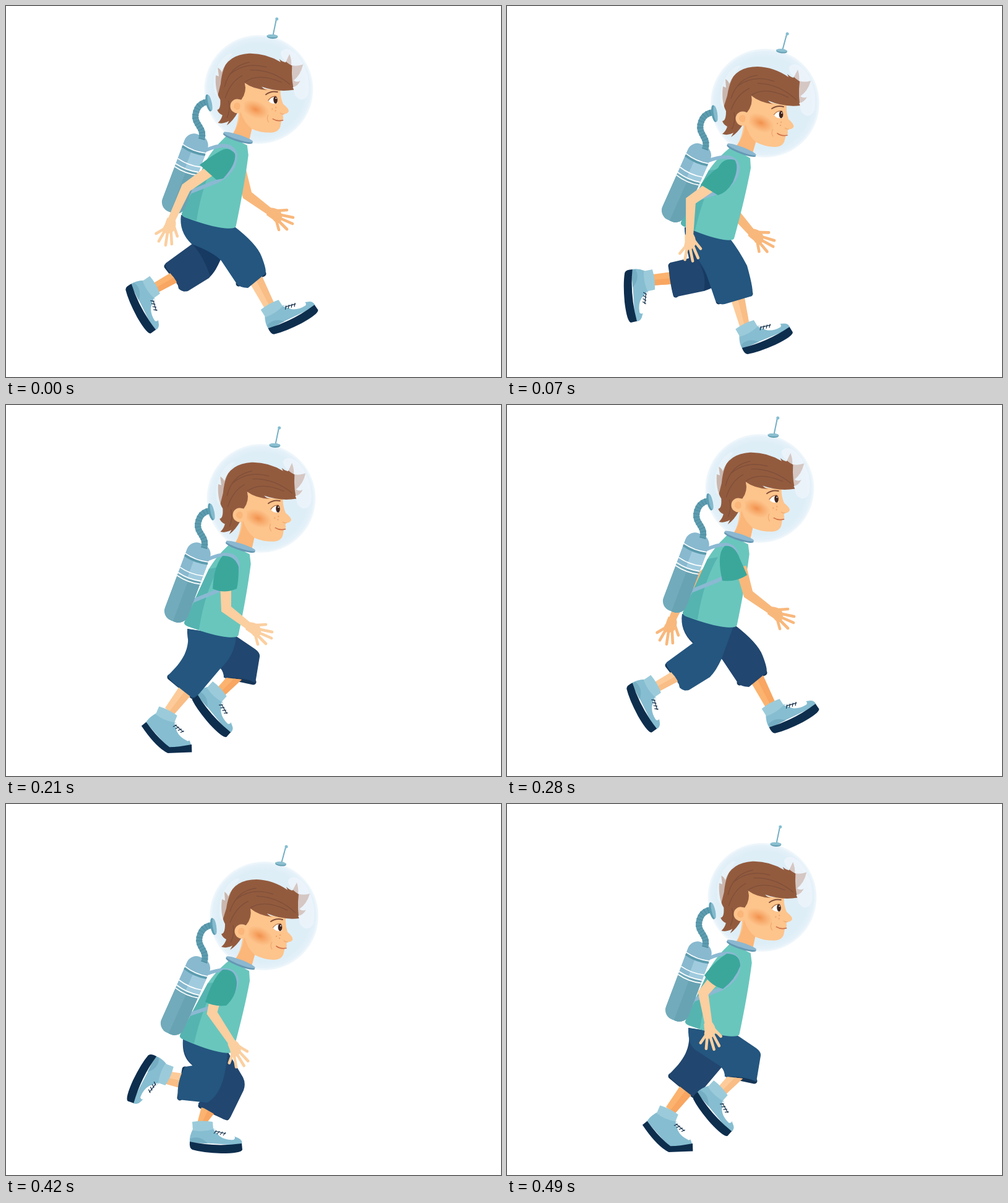
These frames come from a looping animation (800 px wide and 600 px high, 560 ms). An HTML page:

```html
<!DOCTYPE html>
<html lang="en">
<head>
<meta charset="utf-8">
<title>Running space boy</title>
<style>
  html, body { margin: 0; width: 100%; height: 100%; overflow: hidden; background: #fff; }
  svg { display: block; width: 100%; height: 100%; }
  .pose { visibility: hidden; animation: show 560ms step-end infinite; }
  @keyframes show {
    0% { visibility: visible; }
    12.5%, 100% { visibility: hidden; }
  }
</style>
</head>
<body>
<svg viewBox="0 0 800 600">
  <defs>
    <radialGradient id="glass">
      <stop offset=".85" stop-color="#deeef7"/>
      <stop offset=".95" stop-color="#e5f1f9"/>
      <stop offset="1" stop-color="#f3f9fc"/>
    </radialGradient>
    <radialGradient id="blush">
      <stop offset="0" stop-color="#f08a45" stop-opacity=".9"/>
      <stop offset="1" stop-color="#f59a55" stop-opacity="0"/>
    </radialGradient>
    <clipPath id="tankClip"><rect x="-20" y="-67" width="40" height="134" rx="17"/></clipPath>

    <g id="laces">
      <path fill="#fff" d="M17 11Q36 13 48 20Q55 24 50 28Q36 29 27 22Z"/>
      <path fill="none" stroke="#16314c" stroke-width="1.2" d="M18 18l4-5M23 19l4-5M28 20l4-5M33 21l4-5M20 14l17 4"/>
    </g>
    <path id="sock" fill="#9bcbda" d="M-17-1Q0-4 16-1L17 11Q0 16-16 13Z"/>
    <g id="shoe">
      <path fill="#86bdd1" d="M-16 11Q-22 22-21 32L63 37Q65 28 57 25Q40 18 17 10Z"/>
      <path fill="#75aec3" d="M-20 26Q-5 20 8 34L-21 33Z"/>
      <use href="#laces"/>
      <path fill="#0e2e4e" d="M-21 31Q20 40 63 34L64 44Q62 50 30 50Q0 49-17 44Q-22 42-21 31Z"/>
      <use href="#sock"/>
    </g>
    <g id="bentShoe">
      <path fill="#86bdd1" d="M-16 11Q-24 23-24 32L28 52L59 33Q50 20 17 10Z"/>
      <use href="#laces"/>
      <path fill="#0e2e4e" d="M-24 31L-28 40Q8 60 30 60L64 41L58 30Q40 44 28 50Q5 46-24 31Z"/>
      <use href="#sock"/>
    </g>
    <g id="hand">
      <path stroke="none" d="M-4-6Q8-9 17 0Q22 9 15 18Q8 18 4 12Q-2 8-6 5Z"/>
      <path fill="none" stroke-width="4.6" stroke-linecap="round" d="M6-2Q16-2 27-3M13 4L37 9M13 9L36 19M12 13L27 28M9 11L14 29"/>
    </g>

    <g id="head">
      <circle cx="417" cy="157" r="88" fill="url(#glass)"/>
      <path fill="#fdc48c" d="M384 168L396 143Q420 158 452 160Q451 172 455 183Q465 192 463 196Q460 200 454 199Q453 203 454 206L450 211Q450 213 449 216Q447 228 432 228Q415 227 402 220L396 241Q382 238 368 230Q384 212 384 168Z"/>
      <path fill="#fbb679" d="M385 190Q390 210 402 220L396 241Q382 238 368 230Q384 212 385 190Z"/>
      <ellipse cx="410" cy="189" rx="23" ry="14" fill="url(#blush)" transform="rotate(25 410 189)"/>
      <path fill="#935b3e" d="M381 192Q373 205 362 212L366 205Q357 210 348 207Q354 202 356 195Q350 192 348 186Q354 186 354 170Q346 155 349 130L354 132L353 118Q358 121 359 126Q370 98 405 98Q432 99 455 115L453 110Q458 115 463 116L470 103Q473 112 472 121Q480 124 491 121Q486 138 474 146Q480 150 485 147Q480 156 472 157L474 161Q448 164 422 153Q426 158 431 159Q408 156 395 145Q398 160 388 172Q375 171 373 183Z"/>
      <path fill="none" stroke="#80503a" stroke-width="1.5" d="M362 150Q372 116 405 112M362 168Q372 142 392 133M372 130Q398 110 432 122M395 144Q418 129 455 148M405 125Q440 126 468 152M363 200Q370 187 367 172"/>
      <circle cx="381" cy="182" r="11.5" fill="#fdc48c"/>
      <path fill="#fbb679" d="M375 183Q375 176 382 176Q388 179 384 187Q378 190 375 183Z"/>
      <path fill="none" stroke="#824f3a" stroke-width="2" stroke-linecap="round" d="M428 166Q437 160 447 163"/>
      <path fill="#fff" d="M432 177Q437 169 445 171L446 181Q437 183 432 177Z"/>
      <ellipse cx="443" cy="175.5" rx="3.3" ry="6" fill="#40241d"/>
      <circle cx="444" cy="173" r="1" fill="#fff"/>
      <path fill="none" stroke="#9a6445" d="M431 176Q437 168 445 170"/>
      <path fill="none" stroke="#cf7249" stroke-width="1.7" stroke-linecap="round" d="M437 206Q444 211 453 209"/>
      <path fill="none" stroke="#f1a96c" stroke-width="1.2" d="M449 197Q452 200 456 199M430 199Q426 205 430 211"/>
      <path fill="#f0a468" d="M436 189h2v2h-2zM442 187h2v2h-2zM441 192h2v2h-2z"/>
      <path fill="#f1f6fc" fill-opacity=".7" d="M456 100Q459 93 469 95Q488 103 497 139Q500 163 495 172Q486 184 475 170Q470 146 473 122Q456 111 456 100Z"/>
      <path fill="#eef5fb" fill-opacity=".6" d="M378 97Q360 116 356 145L350 164Q343 160 345 138Q352 107 373 96Z"/>
      <path fill="none" stroke="#75afc4" stroke-width="2" d="M445 72L452 46"/>
      <circle cx="453" cy="45" r="2.5" fill="#84bed1"/>
      <ellipse cx="444" cy="73" rx="9" ry="3.5" fill="#659fb3" transform="rotate(6 444 73)"/>
      <ellipse cx="444" cy="72" rx="9" ry="2.4" fill="#8bc0d1" transform="rotate(6 444 72)"/>
    </g>

    <g id="tank" transform="translate(290 286) rotate(24)">
      <g clip-path="url(#tankClip)">
        <path fill="#88b9cf" d="M-20-67h40V-8h-40z"/>
        <path fill="#a0cbde" d="M-3-38h23V-8H-3z"/>
        <path fill="#72abbb" d="M-20-8h40v75h-40z"/>
        <path fill="#68a3b3" d="M0-8h20v75H0z"/>
        <path fill="none" stroke="#fff" stroke-width="1.7" d="M-20-43Q0-38 20-43M-20-19Q0-14 20-19M-20-10Q0-5 20-10M-20-5Q0 0 20-5"/>
        <path fill="none" stroke="#5b9bad" stroke-width="3.5" d="M-20-40Q0-35 20-40"/>
      </g>
    </g>

    <g id="torso">
      <path fill="#69c6bd" d="M357 232Q338 248 326 266L281 350Q280 354 287 357Q325 374 350 378Q365 380 367 376Q385 310 394 262L393 246Q380 240 366 224Z"/>
      <path fill="#55b4b0" d="M326 266L281 350Q280 354 287 357L304 363Q318 300 343 264Z"/>
      <path fill="none" stroke="#8bb9d3" stroke-width="6" d="M326 250Q368 235 373 260Q373 286 342 301L294 317"/>
      <use href="#tank"/>
      <path fill="none" stroke="#5d9caf" stroke-width="10" d="M320 232C327 212 308 208 313 190Q317 174 333 172"/>
      <path fill="none" stroke="#4f8ea2" stroke-width="10.5" stroke-dasharray="1.2 4" d="M320 232C327 212 308 208 313 190Q317 174 333 172"/>
      <ellipse cx="335" cy="174" rx="4.5" ry="14" fill="#5b9db1" transform="rotate(-9 335 174)"/>
      <ellipse cx="337" cy="174" rx="3" ry="13" fill="#84bacd" transform="rotate(-9 337 174)"/>
      <g transform="rotate(21 379 233)">
        <ellipse cx="379" cy="234" rx="25" ry="5" fill="#6598b3"/>
        <ellipse cx="379" cy="232" rx="25" ry="4" fill="#8bb7d0"/>
      </g>
    </g>
  </defs>
  <g id="stage"></g>
</svg>
<script>
  const LIGHT = '#fbcfa0', WARM = '#f8b87c';

  // Shifts and lean of head, torso and pack; the second half of the run repeats them.
  const body = ['translate(-4 -20) rotate(-3.4 379 233)', '', 'translate(0 24)', 'translate(0 -4) rotate(-3.4 379 233)'];

  const passing = { joints: [[339, 312], [333, 338], [366, 387]], turn: 35,
    sleeve: 'M322 320Q335 280 350 268Q372 266 373 290Q372 311 356 326Q336 328 322 320Z' };
  const arms = [
    { joints: [[336, 262], [291, 294], [267, 347]], turn: 75,
      sleeve: 'M347 234Q360 226 370 239Q373 255 351 279L340 281L313 257Q328 245 347 234Z' },
    { joints: [[332, 290], [297, 315], [295, 372]], turn: 55,
      sleeve: 'M341 262Q350 244 368 249Q376 260 365 285Q355 302 341 306L313 289Q330 268 341 262Z' },
    passing,
    { joints: [[355, 288], [356, 330], [393, 358]], turn: 0,
      sleeve: 'M334 297Q336 260 350 244Q370 243 376 262Q376 285 373 297Q352 306 334 297Z' },
    { joints: [[378, 262], [390, 306], [427, 333]], turn: 0, warm: true,
      sleeve: 'M348 284Q338 240 352 228Q368 226 376 248L388 275Q370 287 348 284Z' },
    { joints: [[362, 286], [367, 334], [396, 367]], turn: 5, warm: true,
      sleeve: 'M341 302Q338 255 355 247Q372 245 378 270L381 297Q362 300 341 302Z' },
    passing,
    { joints: [[336, 283], [317, 306], [326, 357]], turn: 50,
      sleeve: 'M319 277Q335 255 355 242Q377 242 377 262Q368 285 349 299Q330 294 319 277Z' }
  ];

  // skin: two points at the hem, two at the ankle; foot: x, y, turn
  const legs = [
    { front: { pants: 'M283 338Q279 365 300 385Q335 398 348 412L372 448Q376 455 391 456L419 433Q422 428 413 405Q405 384 367 355Z',
        skin: [[388, 438], [411, 431], [433, 480], [418, 489]], hem: 'M376 449L416 433', foot: [427, 484, -29] },
      rear: { pants: 'M283 338Q281 368 302 384L258 416Q255 420 266 433Q277 444 279 457Q285 463 294 461L328 440Q338 430 347 410L367 355Z',
        skin: [[270, 429], [284, 443], [246, 463], [237, 449]], hem: 'M260 421L288 457', foot: [240, 452, 60] },
      shade: 'M300 384Q335 395 346 410Q340 428 330 437Q318 402 300 384Z' },
    { front: { pants: 'M287 358C288 395 316 410 323 436L337 477Q343 484 352 482L396 469Q400 463 388 420Q375 395 361 377Z',
        skin: [[361, 472], [383, 467], [392, 517], [377, 521]], hem: 'M342 478L393 465', foot: [385, 516, -26] },
      rear: { pants: 'M287 358Q288 382 294 408L264 415Q260 417 263 440Q267 466 270 471L318 461Q350 452 356 425L361 377Z',
        skin: [[273, 429], [277, 449], [236, 452], [236, 434]], hem: 'M265 420L273 467', foot: [236, 443, 83] },
      shade: 'M306 410Q318 425 323 436L332 455L318 461Q324 432 306 410Z' },
    { front: { pants: 'M286 380C284 410 295 418 310 430C331 448 328 468 311 484Q310 489 320 492L352 510Q361 512 364 504L384 463Q388 452 383 442L358 400Z',
        skin: [[317, 486], [342, 493], [324, 516], [309, 516]], hem: 'M315 488L357 507', foot: [318, 515, 0] },
      rear: { pants: 'M286 380Q285 405 302 423L289 425Q275 450 278 478L325 483Q354 468 358 400Z',
        skin: [[287, 436], [284, 460], [256, 452], [260, 432]], hem: 'M289 429L281 475', foot: [263, 440, 114] },
      shade: 'M294 419L310 430Q324 441 325 452Q318 432 294 419Z' },
    { front: { pants: 'M293 362Q292 392 308 400L346 425Q352 432 352 441Q385 440 403 449L410 407Q411 401 403 395L372 374Z',
        skin: [[356, 441], [381, 444], [353, 470], [340, 459]], hem: 'M358 439L400 448', foot: [345, 460, 47] },
      rear: { pants: 'M293 362C299 395 285 415 262 437Q261 442 277 455L300 473Q305 475 313 466L345 428Q370 405 372 374Z',
        skin: [[283, 451], [302, 466], [271, 501], [257, 490]], hem: 'M265 440L302 471', foot: [262, 496, 27], bent: true },
      shade: 'M346 425L352 432L358 418Z' }
  ];

  const path = (d, fill) => `<path fill="${fill}" d="${d}"/>`;
  const poly = (pts, fill) => path('M' + pts.map(p => p.join(' ')).join('L') + 'Z', fill);
  const mid = (a, b) => [(a[0] + b[0]) / 2, (a[1] + b[1]) / 2];

  function limb(joints, fill) {
    const [s, e, w] = joints;
    const upper = Math.atan2(e[1] - s[1], e[0] - s[0]);
    const lower = Math.atan2(w[1] - e[1], w[0] - e[0]);
    const bend = Math.atan2(Math.sin(lower - upper), Math.cos(lower - upper));
    const angles = [upper, upper + bend / 2, lower];
    const half = [9, 8 / Math.cos(bend / 2), 6];
    const side = sign => joints.map(([x, y], i) => [
      x - sign * half[i] * Math.sin(angles[i]), y + sign * half[i] * Math.cos(angles[i])]);
    return poly([...side(1), ...side(-1).reverse()], fill);
  }

  function arm({ joints, turn }, fill) {
    const [x, y] = joints[2];
    return limb(joints, fill) +
      `<use href="#hand" fill="${fill}" stroke="${fill}" transform="translate(${x} ${y}) rotate(${turn})"/>`;
  }

  function leg({ pants, skin, hem, foot, bent }, near, lift) {
    const [a, b, c, d] = skin;
    const [x, y, turn] = foot;
    return `<path d="${hem}" stroke="#163657" stroke-width="9" stroke-linecap="round"/>` +
      poly(skin, near ? '#fdcb99' : '#fbb36f') +
      poly([mid(a, b), b, c, mid(c, d)], near ? '#f9bd86' : '#f8a662') +
      `<use href="#${bent ? 'bentShoe' : 'shoe'}" transform="translate(${x} ${y - lift}) rotate(${turn})"/>` +
      path(pants, near ? '#24567f' : '#21466f');
  }

  function pose(i) {
    const step = i % 4;
    const nearFront = i < 3 || i === 7;
    const [near, far] = nearFront ? ['front', 'rear'] : ['rear', 'front'];
    const farLift = i === 5 ? 6 : 0;
    const farArm = step < 2 ? arm(arms[(i + 4) % 8], WARM) : '';
    const nearArm = arms[i];
    const part = id => `<use href="#${id}" transform="${body[step]}"/>`;
    return `<g class="pose" style="animation-delay:${i * 70}ms">` +
      farArm +
      leg(legs[step][far], false, farLift) +
      (nearFront ? path(legs[step].shade, '#173a62') : '') +
      leg(legs[step][near], true, 0) +
      part('head') + part('torso') +
      arm(nearArm, nearArm.warm ? WARM : LIGHT) +
      path(nearArm.sleeve, '#3ba79b') + '</g>';
  }

  document.getElementById('stage').innerHTML = arms.map((_, i) => pose(i)).join('');
</script>
</body>
</html>
```
